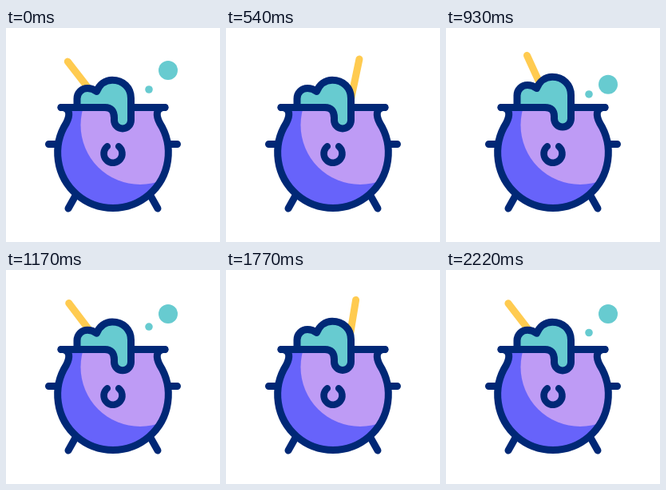
An HTML page with a canvas for the animation above (2250 ms loop, 268 by 268 pixels).

```html
<!DOCTYPE html>
<html lang="en">
<head>
<meta charset="utf-8">
<title>Bubbling cauldron</title>
<style>
  html, body { margin: 0; width: 100%; height: 100%; overflow: hidden; background: #fff; }
  canvas { display: block; width: 100vw; height: 100vh; }
</style>
</head>
<body>
<canvas id="stage"></canvas>
<script>
const SIZE = 268, LOOP = 2250, STEP = 30;
const NAVY = '#002876', TEAL = '#67cbd0', YELLOW = '#ffcb50', LILAC = '#be9bf5', BLUE = '#6763fa';

const canvas = document.getElementById('stage');
const ctx = canvas.getContext('2d');
const ratio = window.devicePixelRatio || 1;
canvas.width = canvas.height = SIZE * ratio;

const body = new Path2D(
  'M69 99.5H72C80 101 80.5 109 75.5 119A69.3 69.3 0 1 0 192.5 119C187.5 109 188 101 196 99.5H199');
const rim = new Path2D('M69 99.5H199');
const supports = new Path2D('M53.5 145.5H66M202 145.5H214.5M78 226L87 210M190 226L181 210');

// Each bubble rises at a steady speed, passing height y at the given moments.
const bubbles = [
  { x: 203, y: 53, r: 12, speed: 0.066, from: -400, to: 490, starts: [0, 1200, 2250] },
  { x: 179, y: 77, r: 4.8, speed: 0.0495, from: -220, to: 540, starts: [0, 1050, 2250] }
];

function line(path, color, width = 9) {
  ctx.strokeStyle = color;
  ctx.lineWidth = width;
  ctx.stroke(path);
}

function disc(x, y, r, color) {
  ctx.fillStyle = color;
  ctx.beginPath();
  ctx.arc(x, y, r, 0, Math.PI * 2);
  ctx.fill();
}

function drawStick(swing) {
  const x = 122.3 - 45 * swing;
  const y = 31.8 + 1.5 * swing + 8.8 * swing * swing;
  const angle = (-13 - 25 * swing) * Math.PI / 180;
  const stick = new Path2D();
  stick.moveTo(x, y);
  stick.lineTo(x - 54 * Math.sin(angle), y + 54 * Math.cos(angle));
  line(stick, YELLOW);
}

function drawPot() {
  line(supports, NAVY);
  ctx.save();
  ctx.clip(body);
  ctx.fillStyle = BLUE;
  ctx.fillRect(0, 0, SIZE, SIZE);
  disc(168, 121.5, 74.5, LILAC);
  ctx.restore();
  line(rim, NAVY);
  line(body, NAVY);
  const ring = new Path2D();
  ring.arc(134, 157.3, 11.5, -0.9, Math.PI + 0.9);
  line(ring, NAVY, 8.5);
}

function drawGoo(lift) {
  const y = v => v - lift;
  const drip = 115.5 - lift / 2;
  const goo = new Path2D(
    `M89 99.5V${y(88.5)}C89 ${y(81)} 95 ${y(75.5)} 102 ${y(75.5)}` +
    `Q108.5 ${y(75.5)} 113.5 ${y(79.5)}C117 ${y(71)} 124 ${y(65.3)} 133 ${y(65.3)}` +
    `C147 ${y(65.3)} 156.5 ${y(75)} 156.5 ${y(88)}V${drip}` +
    `A10.5 10.5 0 0 1 135.5 ${drip}V${drip - 3}Q135.5 99.5 124 99.5Z`);
  ctx.fillStyle = TEAL;
  ctx.fill(goo);
  line(goo, NAVY);
}

function drawBubble(b, time) {
  for (const start of b.starts) {
    const age = time - start;
    if (age <= b.from || age >= b.to) continue;
    const scale = Math.min(1, (age - b.from) / 100, (b.to - age) / 85);
    disc(b.x, b.y - b.speed * age, b.r * scale, TEAL);
  }
}

function draw(time) {
  const swing = Math.cos(time / LOOP * Math.PI * 4);
  ctx.setTransform(canvas.width / SIZE, 0, 0, canvas.height / SIZE, 0, 0);
  ctx.fillStyle = '#fff';
  ctx.fillRect(0, 0, SIZE, SIZE);
  ctx.lineCap = ctx.lineJoin = 'round';
  drawStick(swing);
  drawPot();
  drawGoo(5 * (1 - swing * swing));
  bubbles.forEach(b => drawBubble(b, time));
}

const origin = performance.now();
function tick() {
  const elapsed = (performance.now() - origin) % LOOP;
  draw(Math.floor(elapsed / STEP) * STEP);
  requestAnimationFrame(tick);
}
tick();
</script>
</body>
</html>
```
